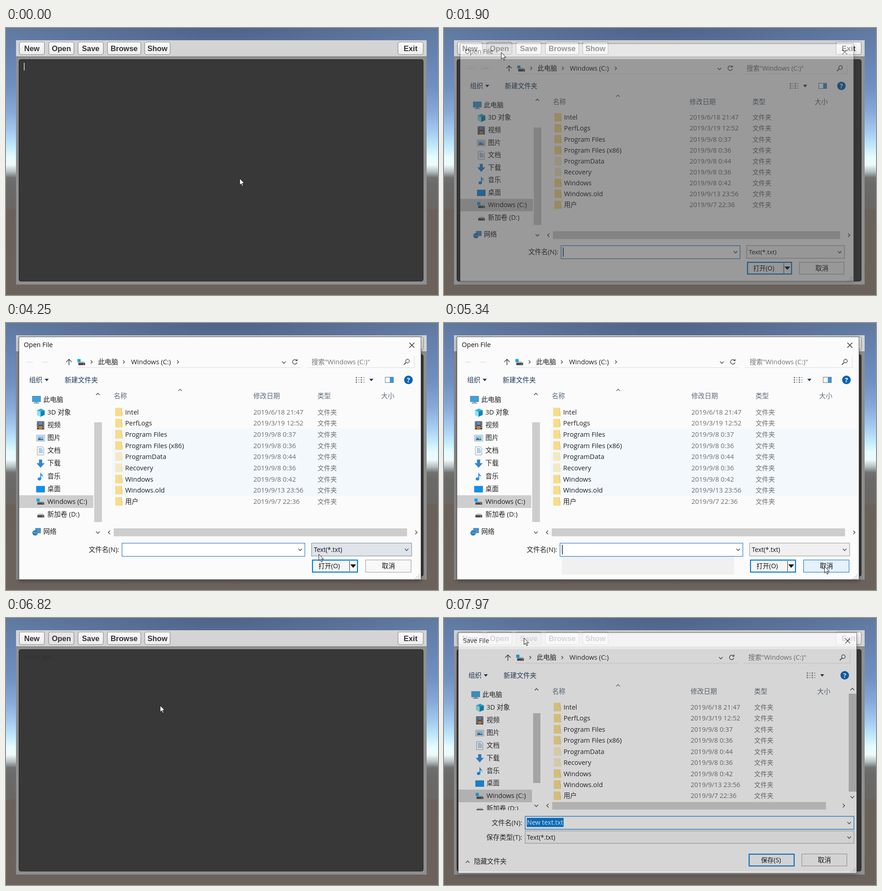
These frames come from a looping animation (950x589 px, 8000 ms). An HTML page:

```html
<!DOCTYPE html>
<html lang="zh">
<head>
<meta charset="utf-8">
<style>
html, body { margin: 0; width: 100%; height: 100%; overflow: hidden; background: #6a625b; }
svg { display: block; width: 950px; height: 589px; }
text { font: 14.6px "Open Sans", "Noto Sans CJK SC", "Noto Sans CJK", sans-serif; white-space: pre; }
.ui { font: bold 16.5px "Liberation Sans", Arial, sans-serif; text-anchor: middle; fill: #333; }
</style>
</head>
<body>
<svg id="stage" viewBox="0 0 950 589" xmlns="http://www.w3.org/2000/svg"></svg>
<script>
const LOOP = 8000;
const BLUE = '#0078d7';
const stage = document.getElementById('stage');

// Drawing helpers
const rect = (x, y, w, h, fill, more = '') =>
  `<rect x="${x}" y="${y}" width="${w}" height="${h}" fill="${fill}" ${more}/>`;
const path = (d, fill = 'none', more = '') => `<path d="${d}" fill="${fill}" ${more}/>`;
const line = (d, color, width = 1) => path(d, 'none', `stroke="${color}" stroke-width="${width}"`);
const label = (x, y, s, color = '#222', more = '') =>
  `<text x="${x}" y="${y + 5.2}" fill="${color}" ${more}>${s}</text>`;
const group = (body, more = '') => `<g ${more}>${body}</g>`;
const at = (x, y, body, more = '') => group(body, `transform="translate(${x} ${y})" ${more}`);
const zoom = s => `translate(360 230) scale(${s}) translate(-360 -230)`;
const chevron = (x, y, turn = 0, size = 4, color = '#555') =>
  `<path d="M${-size} ${-size / 2}L0 ${size / 2}L${size} ${-size / 2}" fill="none" stroke="${color}"
    stroke-width="1.6" transform="translate(${x} ${y}) rotate(${turn})"/>`;
const frame = (id, x, y, w, h, fill, stroke, width = 1.3) =>
  rect(x, y, w, h, fill, `id="${id}" stroke="${stroke}" stroke-width="${width}"`);

function backdrop() {
  const sky = [[0, '#60799f'], [60, '#6682b0'], [130, '#7090c2'], [185, '#87a9d9'], [230, '#a6ccf2'],
    [262, '#c3ebfb'], [285, '#e6fcff'], [302, '#eefafa'], [317, '#b4c0c2'], [330, '#707171'],
    [345, '#6a6a68'], [398, '#6a6764'], [402, '#6a615b'], [589, '#6a625b']];
  const stops = sky.map(([y, c]) => `<stop offset="${y / 589}" stop-color="${c}"/>`).join('');
  return `<defs>
    <linearGradient id="sky" x2="0" y2="1">${stops}</linearGradient>
    <radialGradient id="dusk"><stop stop-color="#506389"/><stop offset="1" stop-color="#506389" stop-opacity="0"/></radialGradient>
    <linearGradient id="key" x2="0" y2="1"><stop stop-color="#fafafa"/><stop offset="1" stop-color="#ececec"/></linearGradient>
    <filter id="shade" x="-5%" y="-5%" width="110%" height="110%">
      <feDropShadow dx="0" dy="2" stdDeviation="5" flood-opacity=".4"/></filter>
    <clipPath id="pane"><rect x="0" y="0" width="950" height="425.8"/></clipPath></defs>`
    + rect(0, 0, 950, 589, 'url(#sky)')
    + '<ellipse cx="475" cy="0" rx="470" ry="90" fill="url(#dusk)"/>';
}

function editor() {
  const keys = [['New', 29.5, 55], ['Open', 94, 55.5], ['Save', 158.5, 55.5],
    ['Browse', 223, 73.5], ['Show', 305, 56], ['Exit', 862, 55.5]];
  return rect(22, 27, 903, 539, '#8f8f8f') + rect(22, 62, 903, 3, '#868686')
    + rect(22, 27, 903, 35.5, '#d4d4d4')
    + rect(28.5, 69.5, 889, 489, '#383838', 'rx="4" stroke="#222"')
    + keys.map(([s, x, w]) => rect(x, 31, w, 27.5, 'url(#key)', `id="key${s}" rx="4" stroke="#8c8c8c" stroke-width="1.2"`)
      + `<text class="ui" x="${x + w / 2}" y="51">${s}</text>`).join('')
    + '<text id="hint" x="40" y="91" fill="#303030" style="font:italic 14.5px \'Liberation Sans\',sans-serif">Enter text...</text>'
    + rect(39.3, 77, 1.5, 16.5, '#e0e0e0', 'id="caret"');
}

// Small icons, centred on 0,0
const drive = path('M-7 1L-5 -2H5L8 1Z', '#b9b9b9') + rect(-7, 1, 15, 5, '#4a4a4a') + rect(4, 3, 2, 1.5, '#7fe08a');
const icons = {
  pc: rect(-9, -8, 18, 12, '#36a3e3', 'stroke="#56788f"') + rect(-6, 6, 12, 2, '#7a93a3') + rect(-2, 4, 4, 2, '#7a93a3'),
  cube: path('M-8 -5L1 -9L9 -5V5L0 9L-8 5Z', '#25b3e0') + path('M-8 -5L0 -2V9L-8 5Z', '#8fe2f5') + path('M0 -2L9 -5V5L0 9Z', '#1383b5'),
  film: rect(-8, -9, 16, 18, '#3b3b3b') + rect(-4, -8, 8, 7, '#5c8fd0') + rect(-4, 1, 8, 7, '#c0814b')
    + line('M-6 -8V8M6 -8V8', '#ddd', 2).replace('/>', ' stroke-dasharray="2 2"/>'),
  photo: rect(-9, -6.5, 18, 13, '#f4f8fb', 'stroke="#8b98a3"') + rect(-7, -4.5, 14, 9, '#8cc6ea') + path('M-7 4.5L-2 -1L2 3L4 1L7 4.5Z', '#3c6b82'),
  page: path('M-7 -9H4L7 -6V9H-7Z', '#fff', 'stroke="#8696a6"') + line('M-4 -5H3M-4 -2H5M-4 1H5M-4 4H5', '#4d8fc9', 1.4),
  down: path('M-3.5 -9H3.5V-1H9L0 9L-9 -1H-3.5Z', '#2f86d8'),
  note: path('M0 -9C1 -4 7 -4 5 3C5 -1 3 -2 1.5 -2V5A4 3.5 0 1 1 -0.5 2.5V-9Z', '#1f8fe6'),
  desk: rect(-9, -6.5, 18, 13, '#0c93ee', 'stroke="#1272b8"'),
  sysdrive: drive + rect(-9, -7.5, 7, 7, '#1fa3e8'),
  drive,
  net: rect(-2, -8, 11, 10, '#4596d6', 'stroke="#3b6f9a"') + '<circle cx="-3" cy="2" r="6" fill="#2f7fc0"/>' + path('M-7 0Q-3 4 2 1', 'none', 'stroke="#9bd0f2"'),
};

function sidebar() {
  const items = [['pc', '此电脑'], ['cube', '3D 对象'], ['film', '视频'], ['photo', '图片'], ['page', '文档'],
    ['down', '下载'], ['note', '音乐'], ['desk', '桌面'], ['sysdrive', 'Windows (C:)'], ['drive', '新加卷 (D:)'], ['net', '网络']];
  return rect(29, 380, 163, 28, '#cecece') + items.map(([icon, s], i) => {
    const top = i === 0 || i === 10;
    const y = i === 10 ? 460 : 168.5 + 28.15 * i;
    return at(top ? 67 : 76, y + 1, icons[icon]) + label(top ? 82 : 91, y, s);
  }).join('');
}

const rowY = i => 196.5 + 24.65 * i;

function files() {
  const rows = [['Intel', '6/18 21:47'], ['PerfLogs', '3/19 12:52'], ['Program Files', '9/8 0:37'],
    ['Program Files (x86)', '9/8 0:36'], ['ProgramData', '9/8 0:44'], ['Recovery', '9/8 0:36'],
    ['Windows', '9/8 0:42'], ['Windows.old', '9/13 23:56'], ['用户', '9/7 22:36']];
  const heads = [[237, '名称'], [544, '修改日期'], [685, '类型'], [825, '大小']];
  const folder = rect(-7.5, -9.5, 14, 18.5, '#f0d583') + path('M-7.5 -9.5H6.5V-1H8V9H-7.5Z', '#f7dc8b')
    + line('M6.5 -9V0H7.5V9', '#dfbf66');
  return heads.map(([x, s]) => label(x, 161, s, '#5d6b7d')).join('') + chevron(383, 148, 180, 4, '#777')
    + rows.map(([s, when], i) => at(248, rowY(i), folder, i === 4 || i === 5 ? 'opacity=".5"' : '')
      + label(262, rowY(i), s) + label(544, rowY(i), '2019/' + when, '#6d6d6d')
      + label(685, rowY(i), '文件夹', '#6d6d6d', 'style="font-size:14.2px"')).join('');
}

function chrome(title, viewX, helpX) {
  const dots = [0, 5, 10].map(y => rect(0, y, 3, 3, '#888') + rect(5, y + 1, 4, 1, '#888')
    + rect(11, y, 3, 3, '#888') + rect(16, y + 1, 4, 1, '#888')).join('');
  return rect(28.5, 30.5, 884, 535.5, '#fbfbfb', 'stroke="#555" filter="url(#shade)"')
    + label(39, 48, title, '#111', 'style="font-size:14.5px"')
    + line('M887 43.5L898 54.5M898 43.5L887 54.5', '#222', 1.3)
    + line('M138.5 93V80M132.5 86L138.5 80L144.5 86', '#555', 1.7)
    + at(166, 87, icons.sysdrive) + chevron(188, 86, -90, 3.5) + label(202.5, 85.5, '此电脑')
    + chevron(259, 86, -90, 3.5) + label(275, 85.5, 'Windows (C:)')
    + chevron(611, 87) + path('M639 82.5A5 5 0 1 0 640 87', 'none', 'stroke="#555" stroke-width="1.5"') + path('M636 84H641V79Z', '#555')
    + line('M155 98.5H648M662 98.5H898V73', '#dcdcdc')
    + label(672, 86, '搜索"Windows (C:)"', '#777')
    + '<circle cx="883" cy="84" r="4" fill="none" stroke="#555" stroke-width="1.5"/>' + line('M880 87L875 92', '#555', 2)
    + label(51, 126, '组织', '#1e395b') + path('M85 123H94L89.500 128.500Z', '#1e395b')
    + label(129, 126, '新建文件夹', '#1e395b')
    + at(viewX, 119, dots) + path(`M${viewX + 30} 123h9l-4.5 5.5Z`, '#1e395b')
    + `<circle cx="${helpX}" cy="125.500" r="9.500" fill="#0a63b8"/>`
    + `<text x="${helpX}" y="131" fill="#fff" text-anchor="middle" style="font-weight:bold">?</text>`
    + chevron(202, 157, 180);
}

const grip = (x, y) => [[8, 0], [4, 4], [8, 4], [0, 8], [4, 8], [8, 8]]
  .map(([dx, dy]) => rect(x + dx, y + dy, 2, 2, '#b8b8b8')).join('');
const small = 'style="font-size:13.7px"';

function openDialog() {
  const tints = [2, 3, 4, 5, 6, 7].map(i => rect(234, rowY(i) - 12.3, 675, 24.7, '#f3f8fd', `id="tint${i}"`)).join('');
  return chrome('Open File', 769, 885)
    + line('M46 86.500H59M80 86.500H92', '#d4d4d4')
    + chevron(378, 86, -90, 3.5)
    + rect(834, 119.5, 18, 12, '#fff', 'stroke="#5f7180"') + rect(844, 120, 8, 11, '#3a96dd')
    + tints + rect(238, 0, 657, 24.7, '#e5f3ff', 'id="hover"')
    + sidebar() + files()
    + rect(194, 219, 17, 220, '#cdcdcd') + chevron(202, 462)
    + rect(237, 453, 645, 17.5, '#cdcdcd', 'id="hscroll"') + chevron(227, 462, 90) + chevron(902, 462, -90)
    + rect(259, 515, 379, 40, '#f0f0f0', 'id="pad"')
    + label(249, 499.5, '文件名(N):', '#222', 'text-anchor="end"')
    + frame('name', 255.2, 485.7, 402, 29, '#fff', '#3f8fd8', 1.4)
    + rect(638, 486.5, 18.5, 27.5, '#e5f1fb', 'id="drop" stroke="#3f8fd8"') + chevron(647, 500)
    + rect(259.5, 489.5, 1.4, 21, '#111', 'id="nameCaret"')
    + frame('type', 672, 485.5, 220, 28.5, '#f5f5f5', '#a8a8a8') + label(677, 499.5, 'Text(*.txt)', '#111', small) + chevron(881, 500)
    + frame('ok', 674, 523, 99, 26.500, '#f6f6f6', BLUE, 2.2) + line('M755.500 525V548', '#333')
    + path('M757 532.500H770L763.500 540Z', '#111') + label(687, 536, '打开(O)', '#111', 'style="font-size:14px"')
    + frame('cancel', 790.700, 522.700, 100, 27, '#f8f8f8', '#adadad') + label(826.500, 536, '取消', '#111')
    + grip(899, 555);
}

function saveDialog() {
  const low = rect(196, 210, 16, 154, '#bdbdbd') + chevron(203, 414)
    + rect(890, 167, 17, 216, '#bdbdbd') + chevron(898, 157, 180) + chevron(898, 395)
    + rect(238, 406, 602, 16.5, '#cdcdcd') + chevron(228, 414, 90) + chevron(879, 414, -90)
    + label(172, 452, '文件名(N):', '#222', 'text-anchor="end"')
    + frame('saveName', 178.5, 437.5, 723, 28.5, '#fbfbfb', '#2b85d8', 1.5)
    + rect(182, 441, 81, 20, BLUE) + label(182.5, 451, 'New text.txt', '#fff', 'style="font-size:14.2px"') + chevron(891, 452)
    + label(172, 484, '保存类型(T):', '#222', 'text-anchor="end"')
    + frame('saveType', 178.5, 469.5, 723, 27.5, '#f5f5f5', '#b0b0b0') + label(182.5, 483.5, 'Text(*.txt)', '#111', small) + chevron(891, 484)
    + chevron(52, 538, 180) + label(66, 537, '隐藏文件夹', '#222', 'style="font-size:14.3px"')
    + frame('saveOk', 671, 521, 99, 26, '#f6f6f6', BLUE, 2.2) + label(697, 534, '保存(S)', '#111', 'style="font-size:14px"')
    + frame('saveNo', 787, 520.5, 99, 26.5, '#f8f8f8', '#adadad') + label(822, 534, '取消', '#111')
    + grip(895, 551);
  return chrome('Save File', 801.5, 886) + group(sidebar(), 'clip-path="url(#pane)"') + files()
    + group(low, `transform="${zoom(1 / .991)}"`);
}

stage.innerHTML = backdrop() + editor()
  + group(openDialog(), 'id="open"') + group(saveDialog(), 'id="save"')
  + path('M0 0V14.500L3.300 11.500L5.600 17L7.900 16L5.600 10.700H10.200Z', '#fff', 'id="mouse" stroke="#111" stroke-width="1"');

const el = {};
stage.querySelectorAll('[id]').forEach(n => el[n.id] = n);
const show = (n, on) => n.setAttribute('visibility', on ? 'inherit' : 'hidden');

// Pointer path: time, x, y
const trail = [
  [400, 514, 332], [600, 478, 302], [800, 360, 200], [1000, 220, 110], [1180, 148, 64], [1310, 126, 54],
  [2350, 126, 54], [2500, 142, 84], [2761, 232, 201], [2900, 305, 275], [3170, 430, 362], [3500, 535, 436],
  [3980, 640, 486], [4250, 688, 510], [4400, 738, 523], [4650, 832, 535], [4850, 848, 538], [5100, 842, 538], [5340, 837, 537],
  [6040, 837, 537], [6200, 780, 498], [6420, 640, 412], [6620, 498, 316], [6810, 339, 193], [6950, 260, 115], [7150, 200, 62], [7370, 176, 44]];
// The pointer is sampled in steps: start, end, count
const bursts = [[470, 1260, 12], [1310, 1310, 2], [2420, 3170, 12], [3240, 3980, 12], [4050, 4850, 13],
  [4920, 5340, 7], [5860, 6620, 11], [6670, 7370, 11]];
// Dialog fades: time, opacity, scale
const openFade = [[0, 0, 1], [1850, .2, .965], [1900, .5, .979], [1970, .8, .99], [2050, .95, .997], [2120, 1, 1],
  [5860, .95, .998], [5930, .6, .985], [6000, .25, .97], [6070, 0, 1]];
const saveFade = [[0, 0, 1], [7840, .2, .965], [7900, .5, .979], [7970, .81, .991]];

const last = (table, t) => table.filter(row => row[0] <= t).pop();

function snap(t) {
  const burst = last(bursts, t);
  if (!burst) return 0;
  const [from, to, n] = burst;
  const step = (to - from) / (n - 1) || 1;
  return Math.min(to, from + Math.floor((t - from + 5) / step) * step);
}

function pointer(t) {
  const i = trail.findIndex(p => p[0] > t);
  if (i === 0) return trail[0].slice(1);
  if (i < 0) return trail[trail.length - 1].slice(1);
  const [a, b] = [trail[i - 1], trail[i]];
  const k = (t - a[0]) / (b[0] - a[0]);
  return [a[1] + (b[1] - a[1]) * k, a[2] + (b[2] - a[2]) * k];
}

function pose(node, [, alpha, scale]) {
  show(node, alpha > 0);
  node.setAttribute('opacity', alpha);
  node.setAttribute('transform', zoom(scale));
}

function draw(t) {
  const [x, y] = pointer(snap(t));
  const within = (a, b, c, d) => x >= a && x <= c && y >= b && y <= d;
  const between = (a, b) => t >= a && t < b;
  const paint = (n, fill, stroke) => {
    n.setAttribute('fill', fill);
    if (stroke) n.setAttribute('stroke', stroke);
  };
  el.mouse.setAttribute('transform', `translate(${Math.round(x)} ${Math.round(y)})`);

  show(el.caret, t < 560 || between(1150, 1460));
  show(el.hint, t >= 1580);
  paint(el.keyOpen, t < 1460 ? 'url(#key)' : t < 1520 ? '#dcdcdc' : t < 6070 ? '#c8c8c8' : '#e6e6e6');
  paint(el.keySave, t < 7520 ? 'url(#key)' : t < 7585 ? '#dcdcdc' : '#c8c8c8');

  pose(el.open, last(openFade, t));
  pose(el.save, last(saveFade, t));

  const row = Math.floor((y - rowY(0) + 12.3) / 24.65);
  show(el.hover, between(2420, 5860) && x > 238 && x < 895 && row >= 0 && row < 9);
  el.hover.setAttribute('y', rowY(row) - 12.3);
  for (let i = 2; i < 8; i++) show(el['tint' + i], t > 2800 && y > rowY(i));
  paint(el.hscroll, within(237, 453, 882, 470) ? '#a6a6a6' : '#cdcdcd');
  show(el.drop, within(638, 486, 657, 514));
  show(el.nameCaret, between(1850, 2420) || between(2950, 3480) || t >= 4920);
  show(el.pad, t >= 4920);
  if (within(672, 486, 892, 514)) paint(el.type, '#dfe4ea', '#8d9aa6');
  else paint(el.type, t > 4300 ? '#f0f0f0' : '#f5f5f5', '#a8a8a8');
  paint(el.ok, within(673, 522, 773, 550) ? '#e5f1fb' : '#f6f6f6');
  const onCancel = within(790, 522, 891, 550);
  paint(el.cancel, !onCancel ? '#f8f8f8' : t >= 5860 ? '#cce4f7' : '#e5f1fb', onCancel ? '#2b85d8' : '#adadad');
}

const start = performance.now();
function tick() {
  draw((performance.now() - start) % LOOP);
  requestAnimationFrame(tick);
}
tick();
</script>
</body>
</html>
```
